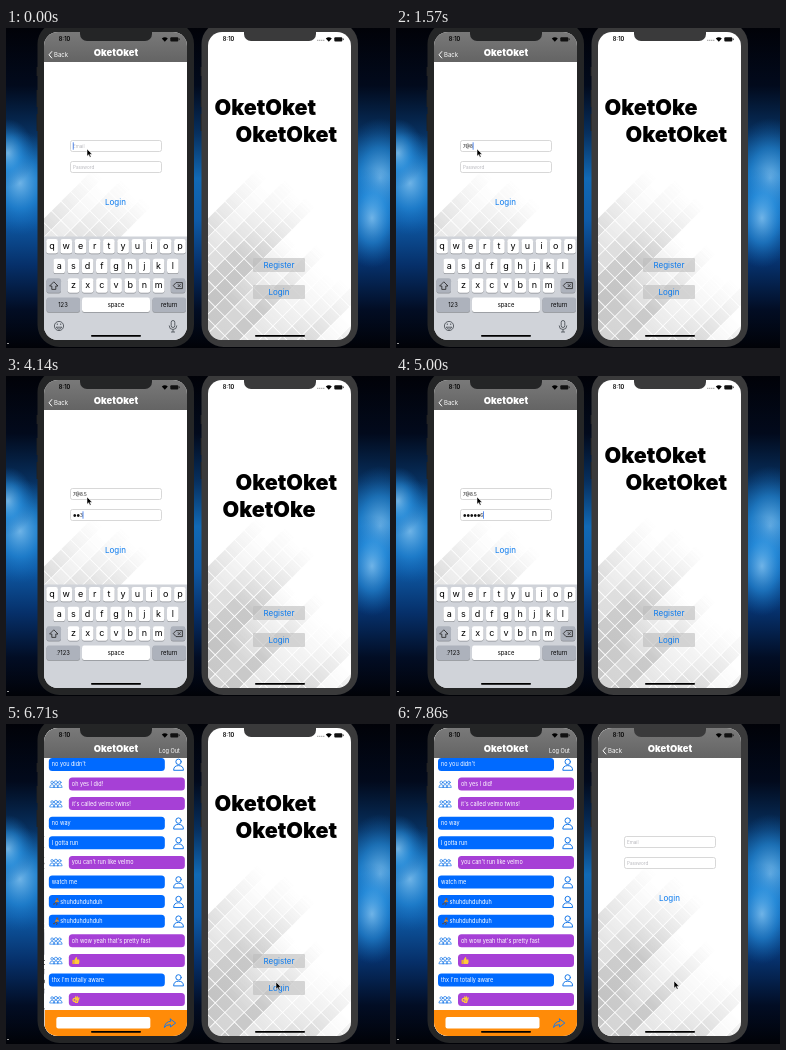
Recreate the animation shown at these times as an HTML page. Size 384 by 320 pixels, loop 8 s.

```html
<!DOCTYPE html>
<html lang="en">
<head>
<meta charset="utf-8">
<title>Chat app demo</title>
<style>
  html, body { margin: 0; width: 100%; height: 100%; overflow: hidden; background: #000; }
  svg { display: block; width: 384px; height: 320px; font-family: Inter, Roboto, sans-serif; }
  .mid { text-anchor: middle; }
  .brand { font-weight: 900; }
  .link { fill: #0a7aee; font-size: 8px; text-anchor: middle; }
  .icon { fill: none; stroke: #1878e8; stroke-width: 1; stroke-linecap: round; stroke-linejoin: round; }
</style>
</head>
<body>
<svg id="stage" viewBox="0 0 384 320"></svg>
<script>
const LOOP = 8000, FPS = 7, SCREEN_W = 143, PHONE_GAP = 164;
const BRAND = 'OketOket', EMAIL = '7@8.5', PASSWORD = '123456';

const rect = (x, y, w, h, fill, extra = '') =>
  `<rect x="${x}" y="${y}" width="${w}" height="${h}" fill="${fill}" ${extra}/>`;
const text = (x, y, size, str, extra = '') =>
  `<text x="${x}" y="${y}" font-size="${size}" ${extra}>${str}</text>`;
const group = (id, body, extra = '') => `<g id="${id}" ${extra}>${body}</g>`;
const noise = n => { const s = Math.sin(n * 78.23 + 4.1) * 4375.8; return s - Math.floor(s); };

const defs = `<defs>
  <clipPath id="screen">${rect(38, 4, SCREEN_W, 308, '#fff', 'rx="14"')}</clipPath>
  <clipPath id="page">${rect(38, 0, SCREEN_W, 314, '#fff')}</clipPath>
  <linearGradient id="fade" gradientUnits="userSpaceOnUse" x1="-200" y1="0" x2="-32" y2="0">
    <stop offset="0" stop-color="#bcbcbc"/><stop offset=".5" stop-color="#c4c4c4"/>
    <stop offset="1" stop-color="#d8d8d8" stop-opacity="0"/></linearGradient>
  <linearGradient id="bar" x1="0" y1="0" x2="0" y2="1">
    <stop offset="0" stop-color="#7c7c7c"/><stop offset="1" stop-color="#646464"/></linearGradient>
  <linearGradient id="sky" x1="0" y1="0" x2="0" y2="1">
    <stop offset="0" stop-color="#010208"/><stop offset=".18" stop-color="#020a1c"/>
    <stop offset=".33" stop-color="#07305f"/><stop offset=".47" stop-color="#1169b4"/>
    <stop offset=".6" stop-color="#0e5aa6"/><stop offset=".74" stop-color="#06306a"/>
    <stop offset=".88" stop-color="#020d24"/><stop offset="1" stop-color="#010207"/></linearGradient>
  <radialGradient id="glow"><stop offset="0" stop-color="#8ecdf8" stop-opacity=".75"/>
    <stop offset=".5" stop-color="#2a93e2" stop-opacity=".55"/>
    <stop offset="1" stop-color="#1268b8" stop-opacity="0"/></radialGradient>
</defs>`;

const glow = (x, y, rx, ry) => `<ellipse cx="${x}" cy="${y}" rx="${rx}" ry="${ry}" fill="url(#glow)"/>`;
const backdrop = rect(0, 0, 384, 320, 'url(#sky)') + glow(14, 155, 40, 52) + glow(2, 125, 26, 34) +
  glow(374, 150, 40, 60) + glow(366, 190, 32, 50) + rect(1, 315, 2, 1, '#999');

// Diagonal strips on one grid of tiles, each fading out at its own length.
function tiles() {
  const pitch = 13.6;
  let out = '';
  for (let k = 0; k < 15; k++) {
    const shift = (noise(k) - .5) * 44 - k * 2.2, tone = .35 + .6 * noise(k + 40);
    out += `<path d="M-260 ${168 + k * pitch}H-32" transform="translate(${shift} 0)" opacity="${tone}"
      stroke="url(#fade)" stroke-width="${pitch - .8}" stroke-dasharray="${pitch - .8} .8" stroke-dashoffset="${shift}"/>`;
  }
  return rect(38, 4, SCREEN_W, 308, '#fff') +
    `<g clip-path="url(#page)"><g transform="rotate(-45)">${out}</g></g>`;
}

const back = `<path d="M46 23.3L43 26.8L46 30.3" fill="none" stroke="#fff"/>` + text(48, 29, 6, 'Back', 'fill="#fff"');
const navBar = rect(38, 0, SCREEN_W, 34, 'url(#bar)') +
  text(110, 28, 9.4, BRAND, 'class="mid brand" fill="#fff"');

const field = (y, hint, id) =>
  rect(64.5, y, 91, 11, '#fff', 'rx="2" stroke="#cfcfcf" stroke-width=".8"') +
  text(67, y + 7.3, 4.6, hint, `id="${id}Hint" fill="#b9b9be"`) +
  text(67, y + 7.3, 4.6, '', `id="${id}" fill="#111"`);
const loginView = id => tiles() + field(112.5, 'Email', id + 'Mail') +
  field(133.5, 'Password', id + 'Pass') + text(109.5, 177, 8, 'Login', 'class="link"');

function keyboard() {
  const key = (x, y, w, fill = '#fff') =>
    rect(x, y + .8, w, 14.4, '#8d9095', 'rx="2.2"') + rect(x, y, w, 14.4, fill, 'rx="2.2"');
  const grey = '#adb2bc';
  let out = rect(38, 208.5, SCREEN_W, 104, '#d0d3d9');
  [['qwertyuiop', 40.3, 211], ['asdfghjkl', 47.4, 230.8], ['zxcvbnm', 61.7, 250.3]].forEach(([row, x0, y]) =>
    [...row].forEach((ch, i) => {
      const x = x0 + i * 14.2;
      out += key(x, y, 11.6) + text(x + 5.8, y + 10, 9, ch, 'class="mid"');
    }));
  out += key(40.5, 250.3, 14.5, grey) + key(164.8, 250.3, 14.5, grey) +
    `<path d="M47.8 253.8L52 258H49.8V261.4H45.8V258H43.6Z" fill="none" stroke="#222" stroke-width=".8"/>
     <path d="M167.3 257.6L170 254.6H176.4V260.6H170Z M171.8 256.2L174.6 259M174.6 256.2L171.8 259" fill="none" stroke="#222" stroke-width=".8"/>` +
    key(40.5, 269.5, 33.5, grey) + key(76, 269.5, 68, '#fff') + key(146.5, 269.5, 33.5, grey) +
    text(57, 279, 5.8, '123', 'id="modeKey" class="mid"') + text(110, 279, 5.8, 'space', 'class="mid"') +
    text(163.2, 279, 5.8, 'return', 'class="mid"') +
    `<g id="extraKeys" fill="none" stroke="#50555c" stroke-width=".9"><circle cx="53" cy="298" r="4.6"/>
     <path d="M50 299.2Q53 303.2 56 299.2ZM51.3 295.5V297M54.7 295.5V297"/>
     <rect x="165.2" y="292.5" width="3.6" height="7" rx="1.8"/>
     <path d="M163.2 297.5Q163.2 301.5 167 301.5T170.8 297.5M167 301.5V304M165 304H169"/></g>`;
  return out;
}

const runner = y => `<g transform="translate(46 ${y - 3.5})"><circle cx="4.4" cy="1" r="1.1" fill="#8d5a3b"/>
  <path d="M4 2L2.6 4.4M4 2.6L6 3.6" stroke="#d88a2c" stroke-width="1.5"/>
  <path d="M2.8 4.4L4.4 5.4L3.6 7.2M2.6 4.4L1.6 6H.2" fill="none" stroke="#59483c"/></g>`;
const thumb = y => `<g transform="translate(65.5 ${y - 3.5})" fill="#ffca3a"><rect y="3" width="2" height="4" rx=".5" fill="#f0ae25"/>
  <path d="M2 3L3.8 .2Q5.3 0 4.7 2.7H6.8Q7.6 5 6.4 7H2Z"/></g>`;
const okHand = y => `<g transform="translate(65.5 ${y - 3.5})" fill="none" stroke="#ffca3a" stroke-width="1.3" stroke-linecap="round">
  <circle cx="2.2" cy="3.8" r="1.5"/><path d="M3.8 3.2L3.3 .8M4.8 3.6L5 .8M5.6 4.4L6.6 1.8M3 6.2H5L5.6 4.4"/></g>`;

const person = y => `<g class="icon"><circle cx="171.7" cy="${y - 2.6}" r="2.7"/>
  <path d="M166.8 ${y + 5.5}Q166.8 ${y + 1.2} 171.7 ${y + 1.2}T176.6 ${y + 5.5}Z"/></g>`;
const crowd = y => `<g class="icon" style="stroke-width:.7">` + [45.3, 52.9, 49.1].map((x, i) => {
  const r = i === 2 ? 1.6 : 1.3;
  return `<circle cx="${x}" cy="${y - 1.6}" r="${r}"/><path d="M${x - 2.4} ${y + 3}Q${x - 2.2} ${y + .6} ${x} ${y + .6}T${x + 2.4} ${y + 3}Z"/>`;
}).join('') + '</g>';

// Each message: who sent it, text, optional emoji.
const messages = [
  ['me', "no you didn't"], ['them', 'oh yes I did!'], ['them', "it's called velmo twins!"],
  ['me', 'no way'], ['me', 'I gotta run'], ['them', "you can't run like velmo"], ['me', 'watch me'],
  ['me', 'shuhduhduhduh', runner], ['me', 'shuhduhduhduh', runner],
  ['them', "oh wow yeah that's pretty fast"], ['them', '', thumb],
  ['me', "thx I'm totally aware"], ['them', '', okHand]
];
const chatView = rect(38, 4, SCREEN_W, 308, '#fff') + messages.map(([who, str, emoji], i) => {
  const y = 40.4 + i * 19.6, mine = who === 'me', x = mine ? 42 : 62;
  return rect(x, y - 6.5, 116, 13, mine ? '#006aff' : '#a640d6', 'rx="3.5"') +
    text(x + (emoji ? 11.5 : 3), y + 2, 5.5, str, 'fill="#fff"') + (emoji ? emoji(y) : '') +
    (mine ? person(y) : crowd(y));
}).join('') + rect(38, 286, SCREEN_W, 27, '#ff8b08') + rect(49.5, 293, 94, 11.5, '#fff', 'rx="2"') +
  `<path class="icon" d="M163.6 295L168.8 299L163.6 303V300.7Q159.5 300.5 157.5 303.5Q158.5 297.5 163.6 297.3Z"/>`;

const button = (y, label) => rect(247 - PHONE_GAP, y, 52, 14, '#bdbdbd', 'opacity=".6" rx="1"') +
  text(273 - PHONE_GAP, y + 10, 8, label, 'class="link"');
const homeView = tiles() + [[44.5, 87], [65.5, 114], [52.5, 141]].map(([x, y], i) =>
  text(x, y, 21.5, BRAND, `id="title${i}" class="brand"`)).join('') +
  button(230, 'Register') + button(257, 'Login');

function phone(x, views, shell, dots) {
  return `<g transform="translate(${x} 0)">` +
    rect(30.6, 39, 2, 9, '#222') + rect(30.6, 62, 2, 17, '#222') + rect(30.6, 86, 2, 17, '#222') +
    rect(31.5, -6, 156.5, 325, shell, 'rx="22"') +
    `<g clip-path="url(#screen)">${views}</g>` +
    rect(74, -8, 72, 21, shell, 'rx="7"') +
    text(58.5, 13.4, 5.6, '8:10', 'class="mid" font-weight="600"') +
    (dots ? [0, 2, 4, 6].map(d => rect(147.3 + d, 11.8, 1, 1, '#777')).join('') : '') +
    `<path d="M158.8 13.8L155.8 10.6Q158.8 8 161.8 10.6Z"/>` +
    rect(164.3, 9.2, 8, 4.2, '#111', 'rx="1"') + rect(172.8, 10.5, .8, 1.6, '#111') +
    rect(85, 307, 50, 1.7, '#000', 'rx=".85"') + '</g>';
}

const left = group('leftLogin', loginView('l') + keyboard() + rect(0, 0, .8, 7.4, '#2f6fe8', 'id="caret"')) +
  group('chat', chatView) + navBar + group('leftBack', back) +
  group('logOut', text(153, 28.6, 5.6, 'Log Out', 'fill="#fff"'));
const right = group('home', homeView) + group('rightLogin', loginView('r') + navBar + back);

const stage = document.getElementById('stage');
stage.innerHTML = defs + backdrop + phone(0, left, '#242526', false) + phone(PHONE_GAP, right, '#3a3a3b', true) +
  group('pointer', `<path d="M0 0V7.2L1.7 5.7L2.9 8.3L4.1 7.8L2.9 5.2H5.2Z" stroke="#fff" stroke-width=".5"/>`);
const $ = id => document.getElementById(id);

// [time, x, y] of the pointer tip
const path = [[0, 81, 121], [5200, 81, 121], [5800, 108, 175], [6150, 108, 175],
  [6640, 270, 258], [7100, 270, 258], [7700, 278, 257], [LOOP, 278, 257]];
const mailTimes = [700, 1130, 1420, 1850, 2130];
const passTimes = [3280, 3700, 4000, 4420, 4700, 5000];
const PASS_FOCUS = 2420;

const clamp = v => Math.max(0, Math.min(1, v));
const easeOut = (t, start, length) => 1 - (1 - clamp((t - start) / length)) ** 4;
const countPast = (times, t) => times.filter(s => s <= t).length;
const moveX = (id, x) => $(id).setAttribute('transform', `translate(${x} 0)`);

function pointerAt(t) {
  const i = Math.max(1, path.findIndex(p => p[0] >= t));
  const [t0, x0, y0] = path[i - 1], [t1, x1, y1] = path[i];
  const f = (t - t0) / (t1 - t0);
  return [x0 + (x1 - x0) * f, y0 + (y1 - y0) * f];
}

// The top and bottom titles take turns being typed, a letter every 100 ms; the middle one stays.
function setTitles(t) {
  const turnLength = 850, since = t - 897 + 2 * turnLength;
  const turn = Math.floor(since / turnLength);
  const typed = BRAND.slice(0, Math.floor(since % turnLength / 100) + 1);
  $('title0').textContent = turn % 2 ? '' : typed;
  $('title2').textContent = turn % 2 ? typed : '';
}

function setFields(t) {
  const mail = EMAIL.slice(0, countPast(mailTimes, t)), n = countPast(passTimes, t);
  $('lMail').textContent = mail;
  $('lPass').innerHTML = n ? `<tspan font-size="3.8">${'●'.repeat(n - 1)}</tspan>${PASSWORD[n - 1]}` : '';
  $('lMailHint').setAttribute('opacity', mail ? 0 : 1);
  $('lPassHint').setAttribute('opacity', n ? 0 : 1);
  const inPass = t >= PASS_FOCUS, active = $(inPass ? 'lPass' : 'lMail');
  $('modeKey').textContent = inPass ? '.?123' : '123';
  $('extraKeys').setAttribute('opacity', inPass ? 0 : 1);
  $('caret').setAttribute('x', 66.8 + (active.textContent ? active.getComputedTextLength() : 0));
  $('caret').setAttribute('y', inPass ? 135.3 : 114.3);
  const lastKey = Math.max(0, ...[...mailTimes, PASS_FOCUS, ...passTimes].filter(s => s <= t));
  $('caret').setAttribute('opacity', (t - lastKey) % 1000 < 600 ? 1 : 0);
}

function render(t) {
  setTitles(t);
  setFields(t);
  const chatIn = easeOut(t, 6280, 600), loginIn = easeOut(t, 7050, 600);
  moveX('chat', SCREEN_W * (1 - chatIn));
  moveX('leftLogin', -43 * chatIn);
  $('leftBack').setAttribute('opacity', 1 - chatIn);
  $('logOut').setAttribute('opacity', chatIn);
  moveX('rightLogin', SCREEN_W * (1 - loginIn));
  moveX('home', -43 * loginIn);
  $('pointer').setAttribute('transform', `translate(${pointerAt(t)})`);
}

const begin = performance.now();
let shown = -1;
function tick() {
  const t = (performance.now() - begin) % LOOP;
  const step = Math.floor((t + 5) * FPS / 1000) % (LOOP * FPS / 1000);
  if (step !== shown) render((shown = step) * 1000 / FPS);
  requestAnimationFrame(tick);
}
tick();
</script>
</body>
</html>
```
